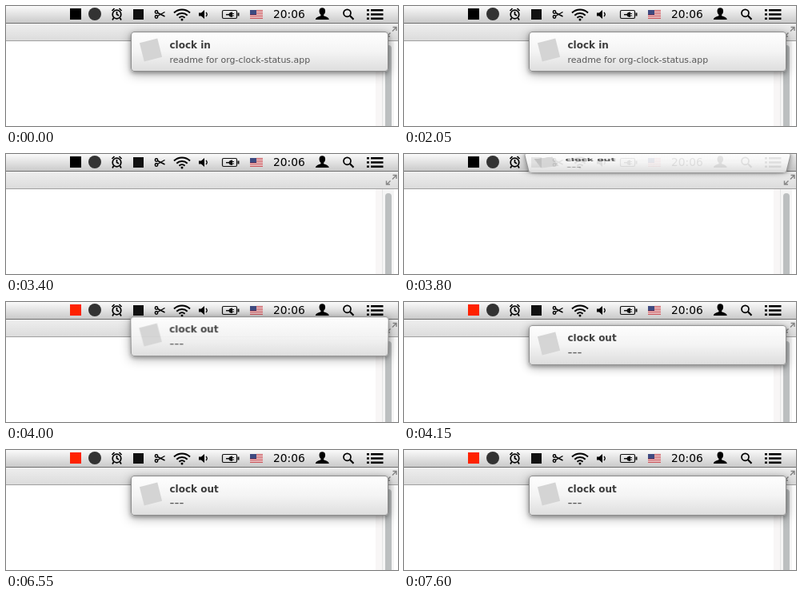
Recreate the animation shown at these times as an HTML page. Size 490 px wide and 150 px high, loop 8000 ms.

```html
<!DOCTYPE html>
<html lang="en">
<head>
<meta charset="utf-8">
<title>Clock status</title>
<style>
  html, body { margin: 0; width: 100%; height: 100%; overflow: hidden; background: #fff; }
  #stage { position: relative; width: 490px; height: 150px; overflow: hidden; }
  svg { display: block; position: absolute; left: 0; top: 0; }
  text { font-family: "DejaVu Sans", sans-serif; }
  #banner {
    position: absolute; left: 156px; top: 32px; width: 320px; height: 48px;
    border: 1px solid #8c8c8c; border-radius: 4px;
    background: linear-gradient(#fefefe, #f4f4f4 50%, #dedede);
    box-shadow: 0 2px 5px rgba(0, 0, 0, .3), 0 3px 14px rgba(0, 0, 0, .34);
    transform-origin: 50% 100%;
  }
</style>
</head>
<body>
<div id="stage">
  <svg width="490" height="150" viewBox="0 0 490 150">
    <defs>
      <linearGradient id="menu" x2="0" y2="1">
        <stop stop-color="#fafafa"/><stop offset="1" stop-color="#cacaca"/>
      </linearGradient>
      <linearGradient id="title" x2="0" y2="1">
        <stop stop-color="#eeeeee"/><stop offset="1" stop-color="#dcdcdc"/>
      </linearGradient>
    </defs>
    <rect width="490" height="150" fill="#fff"/>

    <!-- window -->
    <rect y="22" width="490" height="21" fill="url(#title)"/>
    <rect y="43" width="490" height="1" fill="#a0a0a0"/>
    <rect x="462" y="44" width="9" height="106" fill="#f8f6f6"/>
    <rect x="471" y="44" width="14" height="106" fill="#f5f5f5"/>
    <rect x="470" y="44" width="1" height="106" fill="#e4e4e4"/>
    <rect x="474" y="49" width="8" height="110" rx="4" fill="#bcbfc0"/>
    <path d="M483 31.500l4.500-4.500M483.500 26.500h4.500v4.500M480.500 33.500l-4.500 4.500M475.500 33.500v4.500h4.500" fill="none" stroke="#858585" stroke-width="1.4"/>

    <!-- menu bar -->
    <rect width="490" height="21" fill="url(#menu)"/>
    <rect y="21" width="490" height="1" fill="#707070"/>
    <rect id="status" x="80" y="3" width="14" height="14"/>
    <circle cx="111" cy="10" r="8" fill="#333"/>
    <g fill="none" stroke="#000" stroke-width="1.7">
      <circle cx="138.500" cy="10.500" r="5.300"/>
      <path d="M138.500 7v3.500l2.500 1.500M132.500 6l3-3M144.500 6l-3-3M134.500 15l-1.500 2.500M142.500 15l1.500 2.500"/>
    </g>
    <rect x="159" y="4" width="13" height="13" fill="#111"/>
    <g fill="none" stroke="#000" stroke-width="1.4">
      <circle cx="188" cy="7.500" r="1.700"/>
      <circle cx="188" cy="13.500" r="1.700"/>
      <path d="M189.500 8.500l9 4.500M189.500 12.500l9-5"/>
    </g>
    <path d="M210 8.500a14.500 14.500 0 0 1 20 0M213.300 11.800a9.500 9.500 0 0 1 13.400 0M216.500 14.700a5 5 0 0 1 7 0" fill="none" stroke="#000" stroke-width="2"/>
    <circle cx="220" cy="17" r="1.500"/>
    <path d="M241 8.500h3l4-3.500v11l-4-3.500h-3z"/>
    <path d="M250 8q2.500 2.500 0 5" fill="none" stroke="#000" stroke-width="1.300"/>
    <rect x="270.500" y="5.500" width="18" height="10" rx="1.500" fill="none" stroke="#111" stroke-width="1.200"/>
    <rect x="289.500" y="8.500" width="2" height="4" fill="#111"/>
    <path d="M275 10h3.500q.8-2.500 4.500-2.500v1.500h2v1h-2v1.500h2v1h-2v1.500q-3.700 0-4.500-2.500h-3.500z" fill="#111"/>
    <rect x="305" y="5" width="16" height="11" fill="#f4eeee"/>
    <path d="M305 5.500h16m-16 2h16m-16 2h16m-16 2h16m-16 2h16m-16 2h16" stroke="#c8474e"/>
    <rect x="305" y="5" width="8" height="6" fill="#3f4a80"/>
    <text x="334" y="15" font-size="13.800">20:06</text>
    <path d="M391.500 6.500a3.800 4.300 0 0 1 7.600 0q0 3.200-2 4.600v1.200q6.400 1.700 6.700 4.700h-17q.3-3 6.700-4.700v-1.200q-2-1.400-2-4.600z"/>
    <circle cx="426.500" cy="8.800" r="4.500" fill="none" stroke="#000" stroke-width="1.700"/>
    <path d="M430 12.300l4.500 4.500" stroke="#000" stroke-width="2.200"/>
    <path d="M451 5.200h3m2 0h15.500M451 10.500h3m2 0h15.500M451 15.800h3m2 0h15.500" stroke="#000" stroke-width="2.500"/>
  </svg>

  <div id="banner">
    <svg width="320" height="48" viewBox="157 33 320 48">
      <rect x="169.500" y="43" width="23" height="24" fill="#d4d4d4" transform="rotate(-14 181 55)"/>
      <text id="head" x="204.500" y="52.500" font-size="12" font-weight="bold" fill="#3c3c3c"></text>
      <text id="note" x="204.500" y="71" fill="#555"></text>
    </svg>
  </div>
</div>
<script>
  const LOOP = 8000, LEAVE = 2800, GONE = 3350, STOP = 3900, ENTER = 3700, SETTLE = 4270;
  const HEIGHT = 50, TOP = 32;
  const get = id => document.getElementById(id);
  const banner = get('banner'), head = get('head'), note = get('note'), status = get('status');
  const span = (t, a, b) => Math.min(1, Math.max(0, (t - a) / (b - a)));

  function say(title, detail, size) {
    if (head.textContent === title) return;
    head.textContent = title;
    note.textContent = detail;
    note.setAttribute('font-size', size);
  }

  function slideOut(t) {
    const u = span(t, LEAVE, GONE);
    const p = u * u * (3 - 2 * u);
    banner.style.opacity = 1 - Math.pow(p, 1.15);
    banner.style.transform = p ? `translateX(${212 * p}px)` : 'none';
  }

  // Drops from above while the top edge tips towards the viewer.
  function dropIn(t) {
    const u = span(t, ENTER, SETTLE);
    const p = u + u * u - u * u * u;
    const tilt = 90 * (1 - Math.min(1, u * 1.75));
    const top = -8 + (TOP + 8) * p;
    const bottom = top + HEIGHT * Math.cos(tilt * Math.PI / 180);
    const shift = bottom - TOP - HEIGHT;
    banner.style.opacity = Math.min(u * 12, 0.89 + 0.11 * u);
    banner.style.transform = u < 1
      ? `translateY(${shift}px) perspective(1200px) rotateX(${-tilt}deg)` : 'none';
  }

  function render(t) {
    status.setAttribute('fill', t < STOP ? '#000' : '#ff2200');
    if (t < GONE) {
      say('clock in', 'readme for org-clock-status.app', 10.95);
      slideOut(t);
    } else {
      say('clock out', '---', 16.5);
      dropIn(t);
    }
  }

  const start = performance.now();
  function tick() {
    render((performance.now() - start) % LOOP);
    requestAnimationFrame(tick);
  }
  tick();
</script>
</body>
</html>
```
